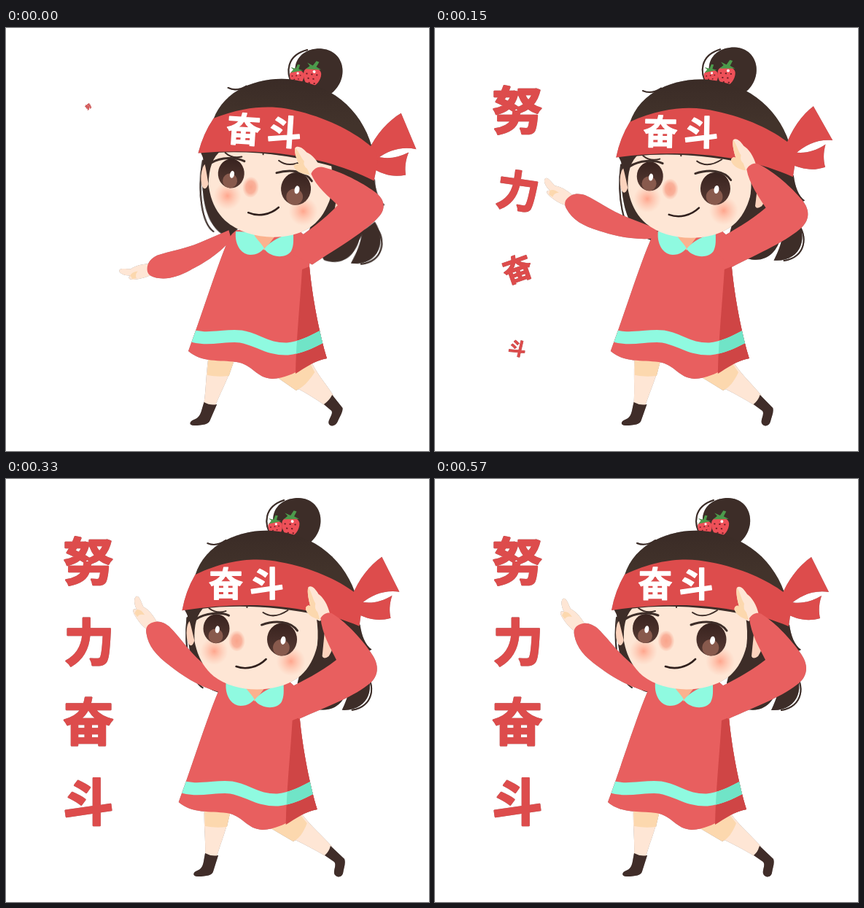
Write an HTML page without scripts that moves like this. It is 580x580 px and loops after 0.6 s.

```html
<!DOCTYPE html>
<html lang="zh">
<head>
<meta charset="utf-8">
<title>努力奋斗</title>
<style>
@property --t { syntax: '<number>'; inherits: true; initial-value: 600; }
@property --q { syntax: '<number>'; inherits: true; initial-value: 0; }
@property --flap { syntax: '<number>'; inherits: true; initial-value: 0; }

html, body { margin: 0; width: 100%; height: 100%; overflow: hidden; background: #fff; }
svg {
  display: block; width: 100vw; height: 100vh;
  animation: clock .6s steps(20) infinite, swing .6s infinite, flap .6s step-end infinite;
}
@keyframes clock { from { --t: 0; } to { --t: 600; } }

/* --q: 1 is the leaning start pose, 0 the resting pose */
@keyframes swing {
  0% { --q: 1; animation-timing-function: steps(2); }
  10% { --q: .71; animation-timing-function: steps(2); }
  20% { --q: .42; animation-timing-function: steps(3); }
  35% { --q: .04; animation-timing-function: steps(2); }
  45% { --q: -.05; animation-timing-function: steps(4); }
  65%, 100% { --q: 0; }
}
@keyframes flap {
  0%, 45%, 75%, 95%, 100% { --flap: 0; }
  5%, 65%, 85% { --flap: -4; }
  35% { --flap: -1; }
}

.edge { filter: drop-shadow(0 0 .7px #999); }
.body { transform: translateX(calc(var(--q) * 13px)); }
.head {
  transform-origin: 337px 290px;
  transform: translate(calc(var(--q) * 14px), calc(var(--q) * -2.5px)) rotate(calc(var(--q) * 3.8deg));
}
.ribbon { transform-origin: 480px 175px; transform: rotate(calc(var(--flap) * 1deg)); }
.point {
  transform-origin: 285px 285px;
  transform: translate(calc(var(--q) * 15px), calc(var(--q) * (var(--q) * 14 - 5) * 1px))
    rotate(calc(var(--q) * -63deg)) scale(calc(1 - var(--q) * .08));
}
.salute {
  transform-origin: 395px 310px;
  transform: translateX(calc(var(--q) * 13px))
    matrix(calc(1 + var(--q) * .06), calc(var(--q) * -.246), calc(var(--q) * .234), calc(1 - var(--q) * .15), 0, 0);
}
.palm { transform-origin: 437px 188px; transform: rotate(calc(var(--q) * 9deg)); }
.leg-l { transform: matrix(1, 0, calc(var(--q) * -.114), 1, calc(var(--q) * 57), 0); }
.leg-r { transform: matrix(1, 0, calc(var(--q) * -.26), 1, calc(var(--q) * 133), 0); }

text {
  font-family: "Noto Sans CJK SC", "Noto Sans CJK", sans-serif;
  font-weight: 900; text-anchor: middle; stroke-linejoin: round;
}
.word text {
  --u: calc((var(--t) - var(--start)) / var(--dur));
  --s: max(0, min(var(--u), max(1, 2.12 - var(--u))));
  font-size: 69px; fill: #dd4c4c; stroke: #dd4c4c; stroke-width: 2.4;
  transform: translateY(calc((1 - var(--s)) * -6px))
    rotate(calc((1 - var(--s)) * var(--turn))) scale(var(--s));
}
.band text { font-size: 47px; fill: #fff; stroke: #fff; stroke-width: 1.4; }

.hair { fill: #3d2d28; }
.red { fill: #e85f5f; }
.band, .ribbon { fill: #dd4c4c; }
.skin { fill: #fee6d5; }
.warm { fill: #fcd8ae; }
.mint { fill: #8ffae0; }
.shoe { fill: #402d29; }
.line { fill: none; stroke: #3d2d28; stroke-width: 2; stroke-linecap: round; }
.lash { stroke-width: 3; }
.mouth { stroke: #30201d; stroke-width: 2.6; }
.stripe { fill: none; stroke: #8ffae0; stroke-width: 17; }
.stripe.dim { stroke: #70e4c7; }
</style>
</head>
<body>
<svg viewBox="0 0 580 580">
  <defs>
    <radialGradient id="blush">
      <stop offset="0" stop-color="#ff9a80" stop-opacity=".85"/>
      <stop offset="1" stop-color="#ffb59c" stop-opacity="0"/>
    </radialGradient>
    <radialGradient id="nose">
      <stop offset="0" stop-color="#f9a48b"/>
      <stop offset=".6" stop-color="#f9ab94" stop-opacity=".9"/>
      <stop offset="1" stop-color="#fbc0aa" stop-opacity=".2"/>
    </radialGradient>
    <linearGradient id="cap" x2="0" y2="1">
      <stop offset="0" stop-color="#3a2b26"/>
      <stop offset=".6" stop-color="#42332b"/>
    </linearGradient>
    <linearGradient id="iris" x2="0" y2="1">
      <stop offset="0" stop-color="#38231f"/>
      <stop offset="1" stop-color="#573a33"/>
    </linearGradient>
    <path id="dress" d="M292 290 Q296 281 304 277 L388 277 L405 292 L403 327 C407 370 417 420 427 453 C401 457 386 479 352 481 C330 480 325 461 303 458 C280 455 255 459 237 443 C255 395 275 330 292 290Z"/>
    <path id="panel" d="M393 331 L403 327 C407 370 417 420 427 453 C410 456 397 466 384 474 C385 425 390 380 393 331Z"/>
    <path id="wave" d="M232 419 C262 431 285 420 309 423 C333 427 345 441 373 440 C395 438 412 427 432 417"/>
    <clipPath id="in-dress"><use href="#dress"/></clipPath>
    <clipPath id="in-panel"><use href="#panel"/></clipPath>
    <g id="berry">
      <path fill="#ee5058" d="M-12 -3 C-11 -13 11 -13 12 -3 C13 6 6 16 0 16 C-6 16 -13 6 -12 -3Z"/>
      <path fill="#4c9a4b" d="M0 -8 L-10 -7 L-5 -12 L-9 -16 L-1 -13 L3 -20 L7 -19 L4 -12 L11 -9Z"/>
      <path fill="none" stroke="#6b2026" stroke-width="2" stroke-linecap="round" stroke-dasharray=".5 6.5" d="M-8 -1 H9 M-5 5 H8 M-3 11 H5"/>
      <circle cx="2" cy="-5" r="2" fill="#fff"/>
    </g>
    <g id="eye">
      <ellipse rx="18" ry="20" fill="url(#iris)"/>
      <circle cx="-1" cy="10" r="10" fill="#885a4d"/>
      <ellipse cx="1.500" cy="1" rx="3" ry="5" fill="#fff" transform="rotate(8)"/>
    </g>
  </defs>

  <g class="word edge">
    <g transform="translate(113 113)"><text dy=".38em" style="--start:-15;--dur:132;--turn:-40deg">努</text></g>
    <g transform="translate(114 224)"><text dy=".38em" style="--start:48;--dur:120;--turn:55deg">力</text></g>
    <g transform="translate(113 333)"><text dy=".38em" style="--start:67;--dur:145;--turn:-45deg">奋</text></g>
    <g transform="translate(113 443)"><text dy=".38em" style="--start:104;--dur:132;--turn:20deg">斗</text></g>
  </g>

  <g class="edge">
    <!-- back hair -->
    <g class="head">
      <path class="hair" d="M250 178 C247 225 254 285 294 293 L310 270 L270 180Z"/>
      <path class="line" d="M249 190 C244 235 254 276 270 286"/>
      <path class="hair" d="M425 180 L486 200 C488 215 493 228 502 234 L490 240 L470 285 C465 306 450 322 424 315 L400 280Z"/>
      <path class="hair" d="M490 258 C509 283 499 319 461 317 C469 300 472 290 474 272Z"/>
      <path class="line" d="M491 264 C509 282 504 313 475 317"/>
    </g>

    <g class="leg-l">
      <path class="skin" d="M272 450 L309 450 C303 480 295 497 289 518 L273 515 C274 495 271 475 272 450Z"/>
      <path class="warm" d="M272 450 L309 450 L303 477 Q288 479 273 476Z"/>
      <path class="shoe" d="M273 513 Q282 518 291 516 L284 538 C283 543 275 545 263 545 C255 545 256 539 262 537 C268 535 270 530 271 524Z"/>
    </g>
    <g class="leg-r">
      <path class="skin" d="M360 477 L405 458 C420 478 435 490 447 504 L438 517 C410 500 385 490 360 477Z"/>
      <path class="warm" d="M360 477 L400 455 L413 472 C408 485 402 493 394 497Z"/>
      <path class="shoe" d="M445 503 L464 521 C466 527 463 533 462 540 C461 546 454 547 451 543 C447 538 454 530 450 525 L437 516 Q443 511 445 503Z"/>
    </g>

    <g class="point">
      <path class="skin" d="M194 210 C186 206 178 196 174 189 C170 182 173 180 177 182 C173 175 172 166 176 164 C180 162 183 172 186 178 C194 182 200 190 205 198Z"/>
      <path class="warm" d="M177 182 Q183 181 188 189 Q181 187 178 192 L174 187Z"/>
      <path class="red" d="M194 202 C205 194 215 199 222 204 C237 218 248 235 268 252 L304 282 L293 292 C262 284 240 269 225 258 C205 244 194 231 191 214 C190 208 191 205 194 202Z"/>
    </g>

    <g class="body">
      <use href="#dress" class="red"/>
      <use href="#panel" fill="#cf4545"/>
      <g clip-path="url(#in-dress)"><use href="#wave" class="stripe"/></g>
      <g clip-path="url(#in-panel)"><use href="#wave" class="stripe dim"/></g>
      <path fill="#fbb28e" d="M322 280 L360 280 L341 305Z"/>
      <path class="mint" d="M302 279 C300 300 312 311 322 311 C332 311 338 306 341 302 C335 292 328 288 326 280Z"/>
      <path class="mint" d="M341 303 C350 315 370 317 378 306 C382 298 381 290 381 281 C365 284 350 292 341 303Z"/>
    </g>

    <g class="head">
      <path class="hair" d="M384 85 C354 62 366 26 402 26 C436 27 443 70 414 90Z"/>
      <path class="line" d="M382 29 C354 38 354 62 365 78"/>
      <use href="#berry" transform="translate(370 66) rotate(-8) scale(.8)"/>
      <use href="#berry" transform="translate(391 63) rotate(4)"/>
      <path fill="url(#cap)" d="M258 140 C267 92 318 68 366 71 C425 76 467 112 482 165Z"/>
      <path class="line" d="M277 88 Q289 93 302 84"/>

      <ellipse cx="254" cy="211" rx="6" ry="17" fill="#fcd3bd"/>
      <path class="skin" d="M254 170 C256 225 262 250 285 270 C315 294 370 294 400 273 C425 255 432 220 433 180Z"/>
      <path class="hair" d="M246 172 L274 174 C262 184 258 200 259 222 C255 205 252 190 246 180Z"/>
      <path class="hair" d="M424 178 L450 186 L447 235 Q432 242 420 259 C430 232 430 205 424 178Z"/>
      <path class="hair" d="M250 165 H440 L436 188 Q345 168 266 178Z"/>
      <path fill="#fcd3bd" d="M437 213 C449 204 455 225 443 243 Q436 248 434 243Z"/>

      <circle cx="286" cy="236" r="19" fill="url(#blush)"/>
      <circle cx="391" cy="250" r="20" fill="url(#blush)"/>
      <ellipse cx="317" cy="222" rx="11" ry="14" fill="url(#nose)"/>
      <use href="#eye" transform="translate(289 205)"/>
      <use href="#eye" transform="translate(379 220) scale(1.14 1.12)"/>
      <path class="line lash" d="M261 192 C274 183 294 182 306 187 M351 200 C370 193 391 195 400 208"/>
      <path class="line" d="M279 177 Q289 185 302 181 M353 183 Q368 193 387 180 M331 172 V176"/>
      <path class="line mouth" d="M316 257 C330 262 346 258 357 247"/>

      <g class="ribbon">
        <path d="M474 163 C484 137 500 118 516 107 L540 155 C520 152 502 159 488 171Z"/>
        <path d="M484 168 C500 172 515 169 530 160 C526 172 526 182 528 191 C510 196 495 192 480 184Z"/>
      </g>
      <g class="band">
        <path d="M260 131 C310 107 350 108 377 114 C420 122 455 138 479 156 Q489 163 488 180 L485 202 C440 183 395 175 345 173 Q295 172 242 180 Q247 153 260 131Z"/>
        <text x="302" y="161">奋</text>
        <text x="358" y="161">斗</text>
      </g>
    </g>

    <g class="salute">
      <g class="palm">
        <path class="skin" d="M430 195 C424 192 414 188 411 180 C409 175 415 172 417 175 C415 168 412 155 414 149 C418 145 424 151 428 158 C434 162 441 172 444 186Z"/>
        <path class="warm" d="M430 193 C424 192 414 188 411 180 C409 175 415 172 417 175 C415 168 412 155 414 149 C419 156 420 165 424 171 Q422 178 427 183Z"/>
      </g>
      <path class="red" d="M431 191 C436 183 444 182 449 186 C468 198 490 222 502 240 C513 256 510 270 500 279 C480 297 440 312 402 329 L383 308 L388 287 C407 277 430 266 453 248 C445 232 433 212 431 191Z"/>
    </g>
  </g>
</svg>
</body>
</html>
```
